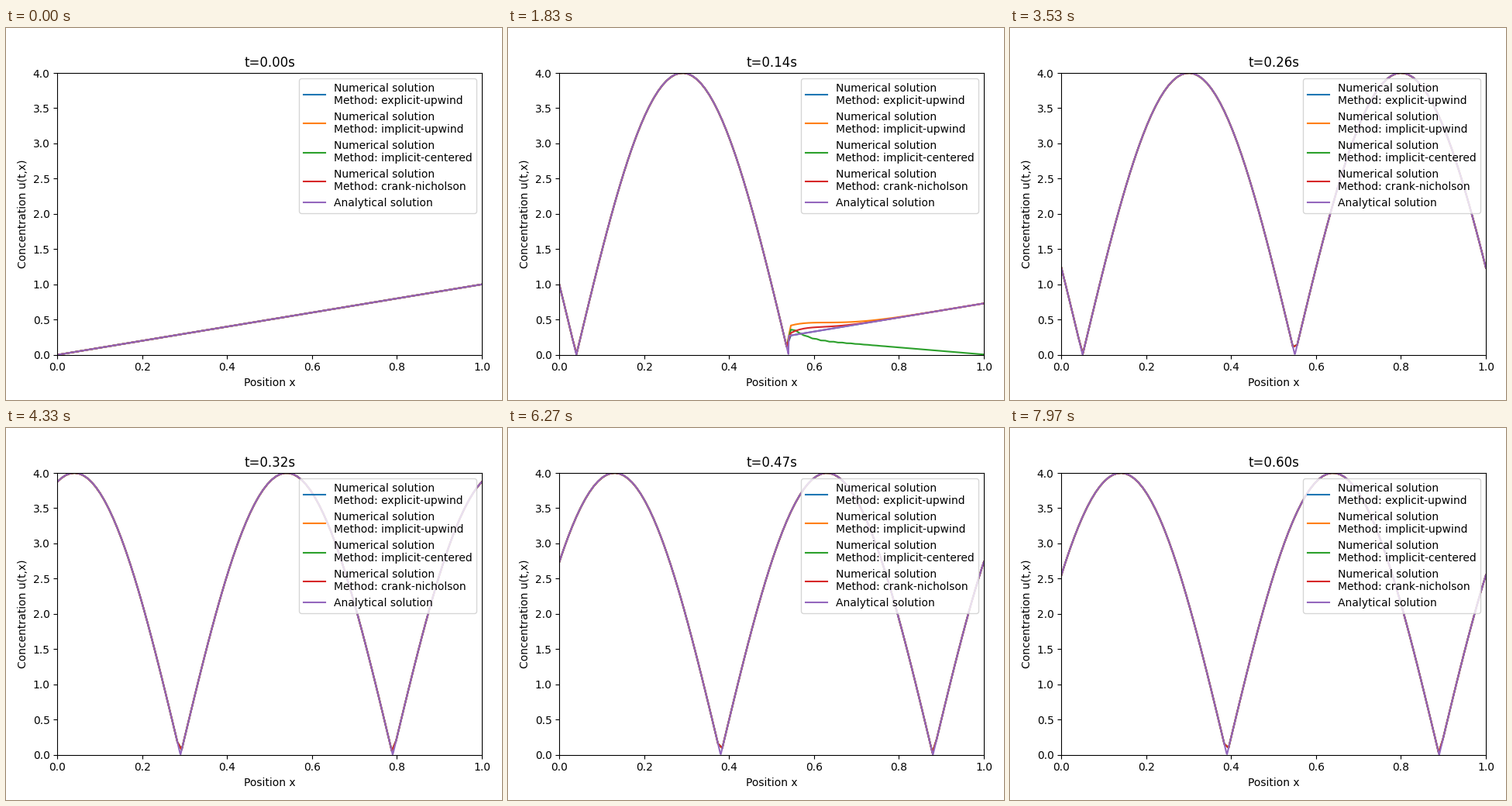
A matplotlib script that plays this animation: 640x480 px, repeating every 8 s.

```python
import numpy as np
import matplotlib.pyplot as plt
from matplotlib.animation import FuncAnimation

FRAMES = 240
DT = 0.0025
SPEED = 4.0
SOURCE = 2.0
CELLS = 100

x = np.linspace(0, 1, CELLS)
x_fine = np.linspace(0, 1, 1000)
cfl = SPEED * DT / (x[1] - x[0])


def inflow(t):
    return 4 * np.abs(np.sin(8 * np.pi * t))


def analytical(t, x):
    return np.where(x <= SPEED * t, inflow(t - x / SPEED), x - SOURCE * t)


def schemes():
    """Pairs (A, B) of the update A u_new = B u_old + source."""
    eye = np.eye(CELLS)
    left = np.eye(CELLS, k=-1)
    right = np.eye(CELLS, k=1)
    upwind = cfl * (eye - left)
    centered = cfl / 2 * (left - right)
    return {
        "explicit-upwind": (eye, eye - upwind),
        "implicit-upwind": (eye + upwind, eye),
        "implicit-centered": (eye + centered, eye),
        "crank-nicholson": (eye + upwind / 2, eye - upwind / 2),
    }


def solve(A, B):
    A = A.copy()
    A[0] = 0
    A[0, 0] = 1
    inverse = np.linalg.inv(A)
    u = x.copy()
    history = [u]
    for n in range(1, FRAMES):
        t = n * DT
        rhs = B @ u + SOURCE * DT
        rhs[0] = inflow(t)
        u = inverse @ rhs
        # behind the front the solution follows the inflow
        u = np.where(x <= SPEED * t, analytical(t, x), u)
        history.append(u)
    return history


fig, ax = plt.subplots(figsize=(6.4, 4.8), dpi=100)
ax.set_xlim(0, 1)
ax.set_ylim(0, 4)
ax.set_xlabel("Position x")
ax.set_ylabel("Concentration u(t,x)")
title = ax.set_title("t=0.00s")

curves = []
for name, (A, B) in schemes().items():
    line, = ax.plot(x, x, label=f"Numerical solution\nMethod: {name}")
    curves.append((line, solve(A, B)))
exact, = ax.plot(x_fine, x_fine, label="Analytical solution")
ax.legend(loc="upper right")

fig.tight_layout()
fig.subplots_adjust(top=1 - 58 / 480)


def update(n):
    t = n * DT
    for line, history in curves:
        line.set_ydata(history[n])
    exact.set_ydata(analytical(t, x_fine))
    title.set_text(f"t={t:.2f}s")
    return [line for line, _ in curves] + [exact, title]


anim = FuncAnimation(fig, update, frames=FRAMES, interval=8000 / FRAMES,
                     repeat=True, repeat_delay=0, blit=False)
plt.show()
```
